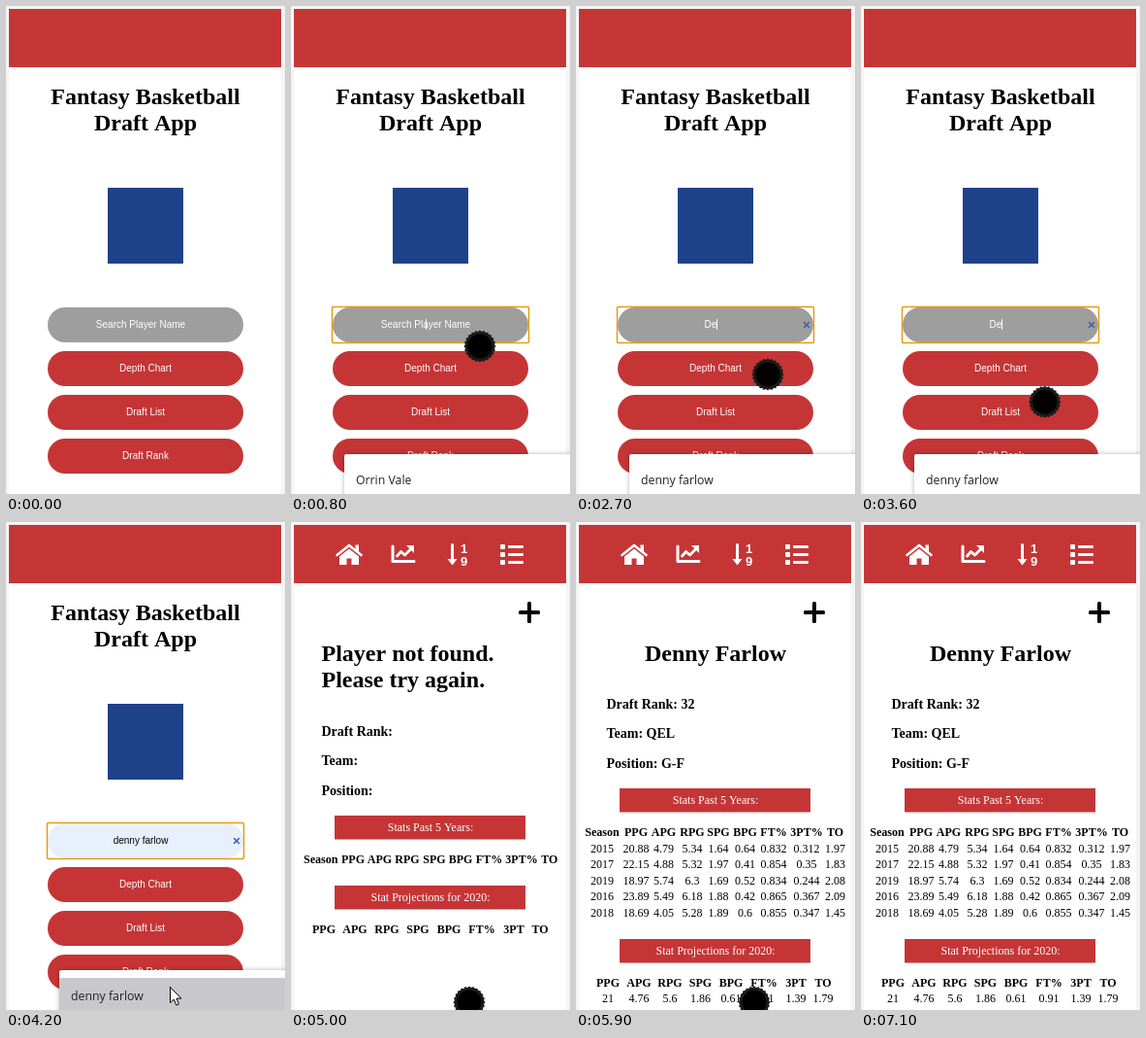
Animation of 288 by 502 pixels, one loop 7200 ms. Source, as an HTML page with a canvas:

```html
<!DOCTYPE html>
<html lang="en">
<head>
<meta charset="utf-8">
<title>Fantasy Basketball Draft App</title>
<style>
html, body { margin: 0; width: 288px; height: 502px; overflow: hidden; background: #fff; }
canvas { display: block; }
</style>
</head>
<body>
<canvas id="stage" width="288" height="502"></canvas>
<script>
const ctx = document.getElementById('stage').getContext('2d');
const LOOP = 7200, STEP = 100;
const RED = '#c53536', BLUE = '#1d428a';
const SERIF = '"Liberation Serif", "Times New Roman", serif';
const SANS = '"Liberation Sans", Arial, sans-serif';
const POPUP = '"Open Sans", "Noto Sans", sans-serif';
const PLAYER = 'Denny Farlow';

// Moments of the story in ms
const FOCUS = 600, TYPE_1 = 2300, TYPE_2 = 2500, PICK = 4300, RESULT = 5000, LOADED = 5400, POINTER_OUT = 6500;

const pointerPath = [
  [100, 296, 300], [400, 190, 330], [700, 191, 332], [800, 195, 350], [1300, 195, 350], [1400, 198, 379],
  [3400, 198, 379], [4100, 169, 478], [4200, 169, 478], [4300, 184, 494], [POINTER_OUT, 184, 494]
];

const seasonHeads = ['Season', 'PPG', 'APG', 'RPG', 'SPG', 'BPG', 'FT%', '3PT%', 'TO'];
const projectionHeads = ['PPG', 'APG', 'RPG', 'SPG', 'BPG', 'FT%', '3PT', 'TO'];
const seasons = [
  '2015 20.88 4.79 5.34 1.64 0.64 0.832 0.312 1.97',
  '2017 22.15 4.88 5.32 1.97 0.41 0.854 0.35 1.83',
  '2019 18.97 5.74 6.3 1.69 0.52 0.834 0.244 2.08',
  '2016 23.89 5.49 6.18 1.88 0.42 0.865 0.367 2.09',
  '2018 18.69 4.05 5.28 1.89 0.6 0.855 0.347 1.45'
];
const projection = '21 4.76 5.6 1.86 0.61 0.91 1.39 1.79';

function text(str, x, y, font, color = '#000', align = 'center') {
  ctx.font = font;
  ctx.fillStyle = color;
  ctx.textAlign = align;
  ctx.fillText(str, x, y);
}

function rect(x, y, w, h, color, radius = 0) {
  ctx.fillStyle = color;
  ctx.beginPath();
  ctx.roundRect(x, y, w, h, radius);
  ctx.fill();
}

function line(points, width, color) {
  ctx.strokeStyle = color;
  ctx.lineWidth = width;
  ctx.lineCap = ctx.lineJoin = 'round';
  ctx.beginPath();
  points.forEach(([x, y]) => ctx.lineTo(x, y));
  ctx.stroke();
}

function polygon(points, color) {
  ctx.fillStyle = color;
  ctx.beginPath();
  points.forEach(([x, y]) => ctx.lineTo(x, y));
  ctx.closePath();
  ctx.fill();
}

const row = (cells, centers, y, weight = '') =>
  cells.forEach((cell, i) => text(cell, centers[i], y, `${weight} 12px ${SERIF}`));

function drawFrame() {
  rect(0, 0, 288, 502, '#f4f4f4');
  rect(3, 3, 281, 499, '#fff');
  rect(3, 3, 281, 60, RED);
}

function drawCaret(t, x) {
  const since = t >= PICK ? PICK : t >= TYPE_2 ? TYPE_2 : t >= TYPE_1 ? TYPE_1 : FOCUS;
  if ((t - since) % 1000 < 500) rect(x, 322, 1, 11, t >= PICK ? '#000' : '#fff');
}

function drawSearch(t, hovering) {
  const filled = hovering || t >= PICK;
  const typed = filled ? PLAYER.toLowerCase() : t >= TYPE_2 ? PLAYER.slice(0, 2) : t >= TYPE_1 ? PLAYER[0] : '';
  const font = `10px ${SANS}`;
  rect(43, 310, 202, 36, filled ? '#e8f0fe' : '#9e9e9e', 18);
  text(typed || 'Search Player Name', 139, 331, font, filled ? '#000' : '#fff');
  if (typed) {
    line([[235.5, 325.5], [240.5, 330.5]], 1.6, '#3d62a3');
    line([[240.5, 325.5], [235.5, 330.5]], 1.6, '#3d62a3');
  }
  if (t < FOCUS) return;
  ctx.strokeStyle = '#e59a10';
  ctx.lineWidth = 1.5;
  ctx.beginPath();
  ctx.roundRect(42.5, 309.5, 203, 37, 1.5);
  ctx.stroke();
  if (!hovering) drawCaret(t, Math.round(139 + ctx.measureText(typed).width / 2));
}

function drawDropdown(t, hovering) {
  ctx.save();
  ctx.shadowColor = 'rgba(0,0,0,.3)';
  ctx.shadowBlur = 5;
  rect(55, 461, 240, 60, '#fff', 2);
  ctx.restore();
  if (hovering) rect(55, 469, 233, 33, '#c8c8cc');
  text(t < TYPE_1 ? 'Orrin Vale' : PLAYER.toLowerCase(), 67, 492, `12.3px ${POPUP}`, '#222', 'left');
}

function drawHome(t, hovering) {
  const title = `bold 24px ${SERIF}`;
  text('Fantasy Basketball', 144, 101, title);
  text('Draft App', 144, 128, title);
  rect(105, 187, 78, 78, BLUE);
  drawSearch(t, hovering);
  ['Depth Chart', 'Draft List', 'Draft Rank'].forEach((label, i) => {
    const y = 355 + 45 * i;
    rect(43, y, 202, 36, RED, 18);
    text(label, 144, y + 21, `10px ${SANS}`, '#fff');
  });
  if (t >= FOCUS && t < PICK) drawDropdown(t, hovering);
}

function drawIcons() {
  const white = '#fff';
  // house
  line([[47.5, 34], [60, 24], [72.5, 34]], 2.6, white);
  rect(66.5, 23.5, 3.5, 7, white);
  polygon([[50, 35.5], [60, 27.5], [70, 35.5], [70, 44], [62.5, 44], [62.5, 37.5], [57.5, 37.5], [57.5, 44], [50, 44]], white);
  // chart
  line([[105, 25], [105, 40.5], [127, 40.5]], 3, white);
  line([[109.5, 35], [113.5, 30.5], [117.5, 34], [124, 27.5]], 2.8, white);
  polygon([[119, 24], [127, 24], [127, 32]], white);
  // numeric sort
  line([[166.5, 23.5], [166.5, 39]], 3, white);
  polygon([[161.5, 38], [171.5, 38], [166.5, 44.5]], white);
  text('1', 178.5, 31.5, `bold 13px ${SANS}`, white);
  text('9', 178.5, 44.5, `bold 13px ${SANS}`, white);
  // list
  [25.5, 33.5, 41.5].forEach(y => {
    rect(216, y - 2.5, 5, 5, white, 1);
    rect(224, y - 1.5, 16, 3, white, 1);
  });
  // add
  rect(235, 91, 22, 4, '#000', 1.5);
  rect(244, 82, 4, 22, '#000', 1.5);
}

function banner(label, y) {
  rect(45, y, 197, 24.5, RED);
  text(label, 144, y + 16, `12px ${SERIF}`, '#fff');
}

function drawPlayer(loaded) {
  const title = `bold 24px ${SERIF}`;
  const top = loaded ? 192 : 220;
  const second = loaded ? 429 : 374;
  drawIcons();
  if (loaded) {
    text(PLAYER, 144, 143, title);
  } else {
    text('Player not found.', 31.5, 143, title, '#000', 'left');
    text('Please try again.', 31.5, 170, title, '#000', 'left');
  }
  [['Draft Rank:', '32'], ['Team:', 'QEL'], ['Position:', 'G-F']].forEach(([label, value], i) =>
    text(loaded ? `${label} ${value}` : label, 31.5, Math.round(top + 30.4 * i), `bold 14px ${SERIF}`, '#000', 'left'));

  const statColumns = loaded
    ? [27, 62, 90.5, 120, 147, 174.5, 204, 238, 267.5]
    : [30.7, 64, 91.5, 120, 148, 175, 204.5, 238, 266.7];
  banner('Stats Past 5 Years:', top + 82);
  row(seasonHeads, statColumns, top + 131, 'bold');

  const projectionColumns = loaded
    ? [33, 65, 97, 128.5, 160, 194, 227, 255]
    : [34, 66, 99, 131, 163, 197, 230, 257];
  banner('Stat Projections for 2020:', second);
  row(projectionHeads, projectionColumns, second + 49, 'bold');

  if (!loaded) return;
  seasons.forEach((season, i) => row(season.split(' '), statColumns, Math.round(340 + 16.4 * i)));
  row(projection.split(' '), projectionColumns, 494);
}

function pointerAt(t) {
  const i = pointerPath.findIndex(([time]) => time > t);
  if (i < 1) return null;
  const [t0, x0, y0] = pointerPath[i - 1], [t1, x1, y1] = pointerPath[i];
  const k = (t - t0) / (t1 - t0);
  return [x0 + (x1 - x0) * k, y0 + (y1 - y0) * k];
}

function drawTouch(x, y) {
  ctx.fillStyle = '#1c1c1c';
  ctx.beginPath();
  for (let i = 0; i < 48; i++) {
    const angle = i * Math.PI / 24, r = i % 2 ? 15.2 : 16.5;
    ctx.lineTo(x + r * Math.cos(angle), y + r * Math.sin(angle));
  }
  ctx.fill();
  ctx.fillStyle = '#000';
  ctx.beginPath();
  ctx.arc(x, y, 12.5, 0, 7);
  ctx.fill();
}

function drawArrow(x, y) {
  const shape = [[0, 0], [0, 16], [3.8, 12.6], [6.4, 18.5], [9, 17.4], [6.5, 11.6], [11.5, 11.6], [0, 0]]
    .map(([dx, dy]) => [x + dx + .5, y + dy + .5]);
  polygon(shape, '#fff');
  line(shape, 1, '#000');
}

function draw(now) {
  const t = Math.floor(now % LOOP / STEP) * STEP;
  const pointer = pointerAt(t);
  const hovering = t < PICK && !!pointer && pointer[1] > 461;
  drawFrame();
  if (t < RESULT) drawHome(t, hovering);
  else drawPlayer(t >= LOADED);
  if (pointer) (hovering ? drawArrow : drawTouch)(...pointer);
}

const start = performance.now();
function tick() {
  draw(performance.now() - start);
  requestAnimationFrame(tick);
}
tick();
</script>
</body>
</html>
```
